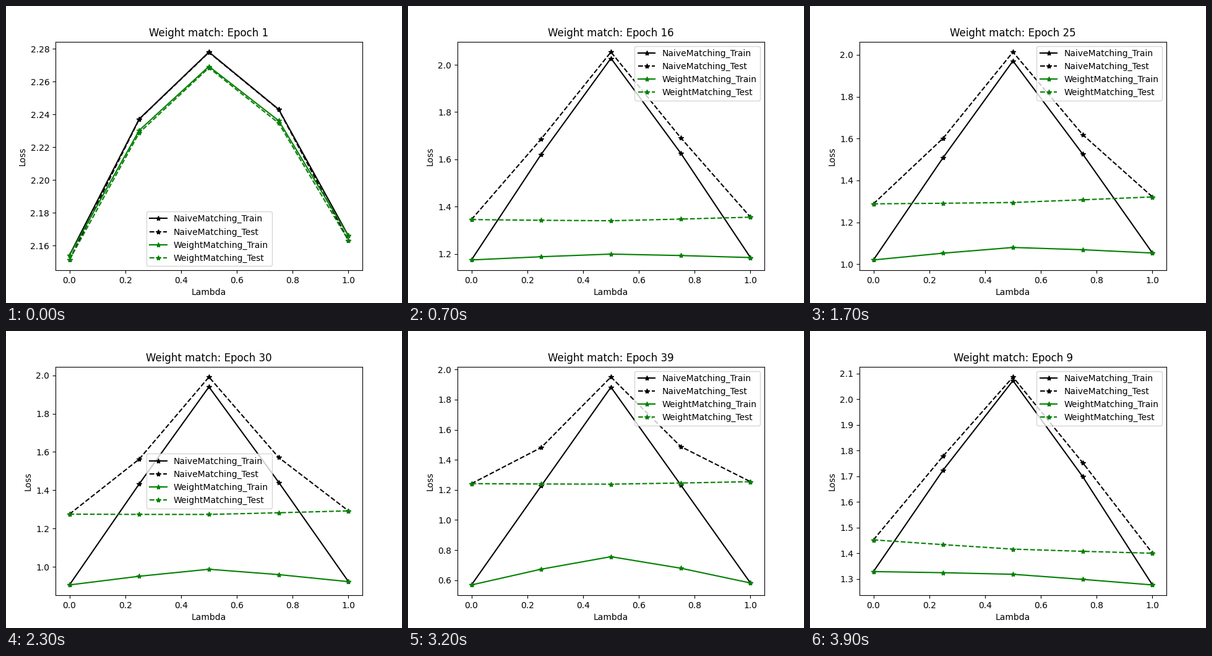
A matplotlib script that plays this animation: 640 by 480 pixels, repeating every 4 s.

```python
import numpy as np
import matplotlib.pyplot as plt
from matplotlib.animation import FuncAnimation

LAMBDAS = np.linspace(0, 1, 5)

# Epochs are played in the order of their names sorted as text.
EPOCHS = sorted(range(1, 41), key=str)

STYLES = [
    ("NaiveMatching_Train", "black", "-"),
    ("NaiveMatching_Test", "black", "--"),
    ("WeightMatching_Train", "green", "-"),
    ("WeightMatching_Test", "green", "--"),
]


def bump(e, center, width):
    return np.exp(-((e - center) / width) ** 2)


def decay(e, rate, power):
    return np.exp(-rate * (e - 1) ** power)


def curve(base, rise, share, tilt):
    """Peak of height rise over a tilted base; quarter points reach a share of it."""
    shape = np.array([0, share, 1, share, 0])
    return base + rise * shape + tilt * (LAMBDAS - 0.5)


def losses(e):
    """The four loss curves at epoch e."""
    late = e / 40
    first = 1 / e ** 4

    # Loss of the two networks themselves, at the ends of the path
    train = 1.195 + 0.965 * decay(e, 0.395, 0.81) - 0.67 * late ** 3
    test = 1.4 + 0.761 * decay(e, 0.528, 0.753) - 0.0039 * e
    tilt = 0.013 - 0.065 * bump(e, 9, 4) + 0.02 * bump(e, 25, 4)

    # Barrier halfway between the networks
    early = 0.34 * 0.46 ** e
    naive_train = 2.128 - 0.00628 * e + early - train
    naive_test = 2.126 - 0.0045 * e + early - test
    match_train = 0.015 + 0.221 * bump(e, 2.5, 1.626) + 0.184 * late ** 4
    match_test = -0.01 + 0.249 * bump(e, 2.5, 1.77)

    # How full each curve is at its quarter points
    share_train = 0.54 - 0.001 * e + 0.14 * first
    share_test = 0.55 - 0.0035 * e - 0.00005 * e ** 2 + 0.14 * first
    share_match = 0.56 + 0.11 * first

    return (
        curve(train, naive_train, share_train, tilt),
        curve(test, naive_test, share_test, tilt),
        curve(train, match_train, share_match, tilt),
        curve(test, match_test, share_match, tilt),
    )


fig, ax = plt.subplots(figsize=(6.4, 4.8), dpi=100)


def draw(i):
    epoch = EPOCHS[i]
    ax.clear()
    for loss, (label, color, line) in zip(losses(epoch), STYLES):
        ax.plot(LAMBDAS, loss, color=color, linestyle=line, marker="*", label=label)
    ax.set_xlabel("Lambda")
    ax.set_ylabel("Loss")
    ax.set_title(f"Weight match: Epoch {epoch}")
    ax.legend(loc="best")


anim = FuncAnimation(fig, draw, frames=len(EPOCHS), init_func=lambda: None,
                     interval=100, repeat=True, repeat_delay=0)
plt.show()
```
